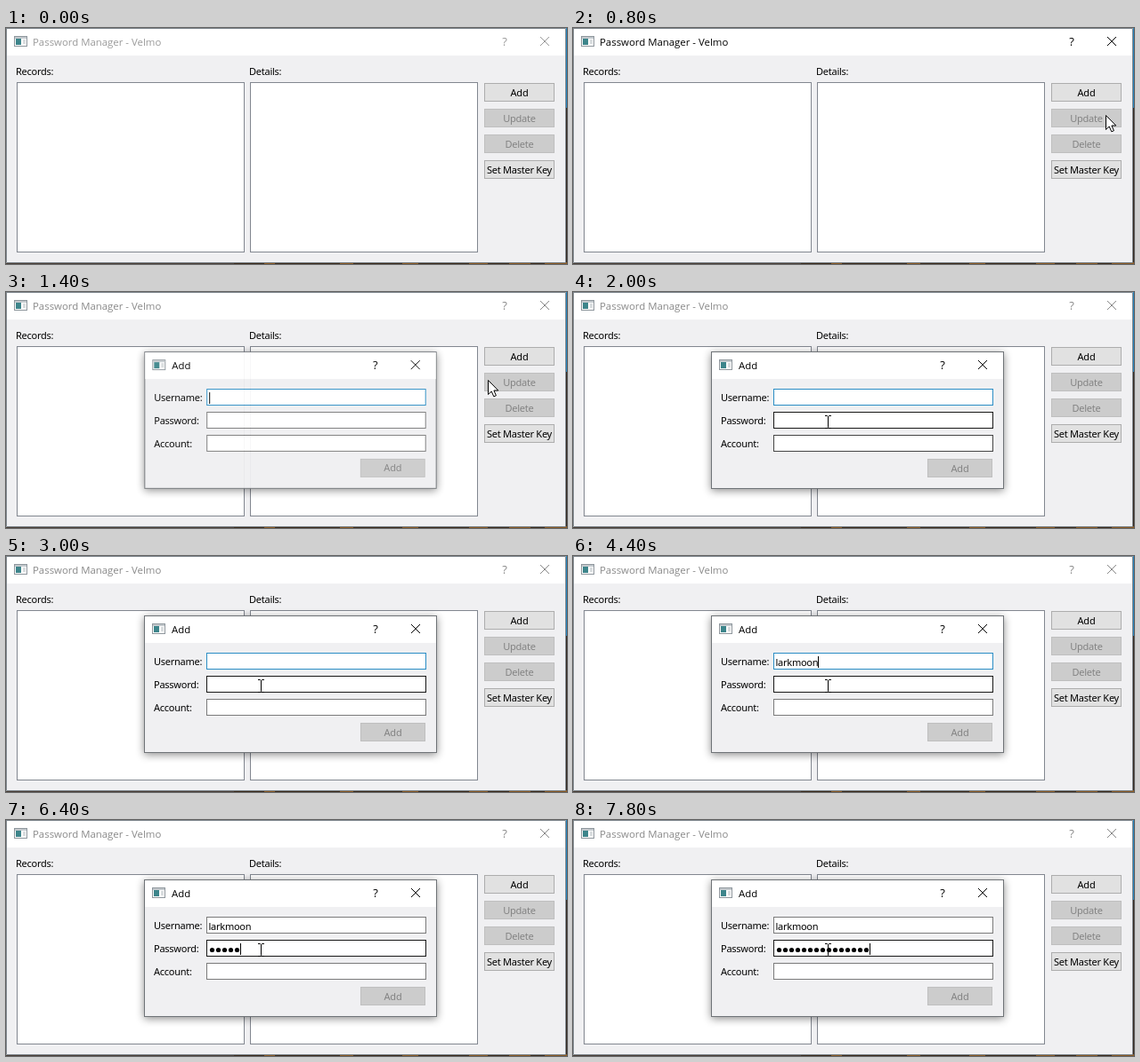
An HTML page that plays this animation: 630 px wide and 266 px high, repeating every 8 s.

```html
<!DOCTYPE html>
<html lang="en">
<head>
<meta charset="utf-8">
<title>Password manager</title>
<style>
  html, body { margin: 0; width: 100%; height: 100%; overflow: hidden; background: #f0f0f2; }
  svg { display: block; }
  text { font: 11px "Noto Sans", "Open Sans", sans-serif; letter-spacing: -.25px; white-space: pre; fill: #000; }
  .title { font: 11.4px "Open Sans", "Noto Sans", sans-serif; letter-spacing: 0; }
  .mid { text-anchor: middle; }
  .off { fill: #838383; }
  #dialog { filter: drop-shadow(0 2px 5px rgba(0, 0, 0, .45)); }
</style>
</head>
<body>
<svg id="stage" width="630" height="266" viewBox="0 0 630 266"></svg>
<script>
const box = (x, y, w, h, fill, stroke, id = '') =>
  `<rect id="${id}" x="${x + .5}" y="${y + .5}" width="${w - 1}" height="${h - 1}" fill="${fill}" stroke="${stroke}"/>`;
const fill = (x, y, w, h, color) => `<rect x="${x}" y="${y}" width="${w}" height="${h}" fill="${color}"/>`;
const label = (x, y, s, cls = '') => `<text x="${x}" y="${y}" class="${cls}">${s}</text>`;
const button = (x, y, w, h, s, on, id) =>
  box(x, y, w, h, on ? '#e1e1e1' : '#cccccc', on ? '#adadad' : '#bfbfbf', id) +
  label(x + w / 2, y + h / 2 + 4, s, on ? 'mid' : 'mid off');
const icon = (x, y) =>
  box(x, y, 15, 12, '#fbfbfb', '#8f979d') + fill(x + 1, y + 1, 13, 2, '#c3c9cd') +
  fill(x + 2, y + 3, 6, 7, '#3d858b') + fill(x + 10, y + 4, 3, 5, '#d8dcde');
const marks = (help, close, y) =>
  `<text class="title mid" x="${help}" y="${y + 10}" style="font-size:13px">?</text>` +
  `<path d="M${close} ${y}l10 10m0-10l-10 10" fill="none" stroke="currentColor"/>`;
const field = (y, name, id) => label(166, y + 14, name) + box(225, y, 247, 19, '#fff', '#7a7a7a', id);

const stage = document.getElementById('stage');
stage.innerHTML =
  fill(0, 0, 630, 266, '#f0f0f2') + fill(0, 0, 629, 31, '#fff') +
  // slivers of desktop around the window
  fill(629, 0, 1, 90, '#2583bd') + fill(629, 90, 1, 176, '#33281f') +
  fill(0, 265, 630, 1, '#4b4038') + fill(256, 264, 374, 2, '#3b2a1b') +
  [290, 375, 445, 520, 565, 605].map((x, i) => fill(x, 264, 12 + i * 3, 2, '#8a5a24')).join('') +
  '<path d="M0 .5H628.5V264.5H.5V0" fill="none" stroke="#7d858b"/>' +
  icon(9, 9) +
  `<g id="caption">${label(30, 20, 'Password Manager - Velmo', 'title')}${marks(560, 600, 10)}</g>` +
  label(11, 53, 'Records:') + label(273, 53, 'Details:') +
  box(12, 61, 256, 192, '#fff', '#828790') + box(274, 61, 256, 192, '#fff', '#828790') +
  button(537, 62, 79, 21, 'Add', true, 'add') +
  button(537, 91, 79, 21, 'Update') + button(537, 120, 79, 21, 'Delete') +
  button(537, 149, 79, 21, 'Set Master Key', true) +
  '<g id="dialog">' +
  box(155, 67, 329, 155, '#f0f0f2', '#6f7377') + fill(156, 68, 327, 30, '#fff') +
  icon(164, 76) + label(186, 87, 'Add', 'title') + marks(415, 455, 77) +
  field(109, 'Username:', 'user') + field(135, 'Password:', 'pass') + field(161, 'Account:', 'account') +
  button(398, 188, 73, 21, 'Add') +
  '<text id="typed" x="227.5" y="124"></text><g id="dots"></g>' +
  '<rect id="caret" width="1" height="13"/></g>' +
  '<path id="arrow" d="M0 0V16L3.7 12.5L6.3 18.3L8.9 17.2L6.4 11.5H11.3Z" fill="#fff" stroke="#000"/>' +
  '<path id="beam" d="M283 139.5H285.5L286.5 140.5L287.5 139.5H290M286.5 140V152M283 153.5H285.5L286.5 152.5L287.5 153.5H290" fill="none" stroke="#000"/>';

const el = id => document.getElementById(id);
const show = (id, on) => el(id).setAttribute('visibility', on ? 'visible' : 'hidden');
const stroke = (id, color) => el(id).setAttribute('stroke', color);
const USER = 'larkmoon';

// last value whose time has been reached, from [time, value] pairs
const at = (t, steps) => steps.reduce((v, [from, next]) => t >= from ? next : v, steps[0][1]);

const arrowPath = [[0, null], [400, [622, 205]], [600, [618, 150]], [800, [598, 98]],
  [1000, [585, 69]], [1400, [541, 99]], [1600, [490, 116]], [1800, null]];

function draw(t) {
  const caption = at(t, [[0, '#999'], [200, '#000'], [1200, '#777'], [1400, '#888']]);
  el('caption').style.color = caption;
  el('caption').querySelectorAll('text').forEach(e => e.style.fill = caption);

  const hot = t >= 1000 && t < 1400;
  stroke('add', hot ? '#0078d7' : '#adadad');
  el('add').setAttribute('fill', t === 1000 ? '#cce4f7' : hot ? '#e5f1fb' : '#e1e1e1');

  const opacity = at(t, [[0, 0], [1200, .12], [1400, .94], [1600, 1]]);
  const scale = at(t, [[0, .957], [1400, .998], [1600, 1]]);
  el('dialog').setAttribute('opacity', opacity);
  el('dialog').setAttribute('transform', `translate(319.5 144.5) scale(${scale}) translate(-319.5 -144.5)`);
  show('dialog', opacity > 0);

  const tabbed = t >= 4800;
  stroke('user', tabbed ? '#7a7a7a' : '#2a8dc5');
  stroke('pass', t >= 1800 ? '#171717' : '#7a7a7a');
  stroke('account', t === 2000 ? '#444' : '#7a7a7a');

  const typed = at(t, [[0, 0], [3400, 2], [3600, 3], [3800, 4], [4200, 6], [4400, 8]]);
  el('typed').textContent = USER.slice(0, typed);
  const dots = t < 5600 ? 0 : t <= 6600 ? (t - 5400) / 200 : Math.floor(6 + (t - 6600) / 200 * 1.5);
  el('dots').innerHTML = Array.from({ length: dots }, (_, i) =>
    `<circle cx="${231.5 + 7 * i}" cy="146.5" r="2.6"/>`).join('');

  const caretOn = at(t, [[0, 1], [2000, 0], [2600, 1], [3000, 0], [3400, 1], [5200, 0], [5600, 1]]);
  const width = typed ? el('typed').getComputedTextLength() : 0;
  el('caret').setAttribute('x', tabbed ? 228 + 7 * dots : Math.round(228 + width - (typed ? 1 : 0)));
  el('caret').setAttribute('y', tabbed ? 139 : 113);
  el('caret').setAttribute('opacity', caretOn);

  const tip = at(t, arrowPath);
  show('arrow', tip);
  if (tip) el('arrow').setAttribute('transform', `translate(${tip[0] + .5} ${tip[1] + .5})`);
  show('beam', t >= 1800);
  el('beam').setAttribute('transform', t === 1800 ? 'translate(38 -4)' : '');
}

let last = -1;
function tick() {
  const t = Math.floor(performance.now() % 8000 / 200) * 200;
  if (t !== last) draw(last = t);
  requestAnimationFrame(tick);
}
tick();
</script>
</body>
</html>
```
